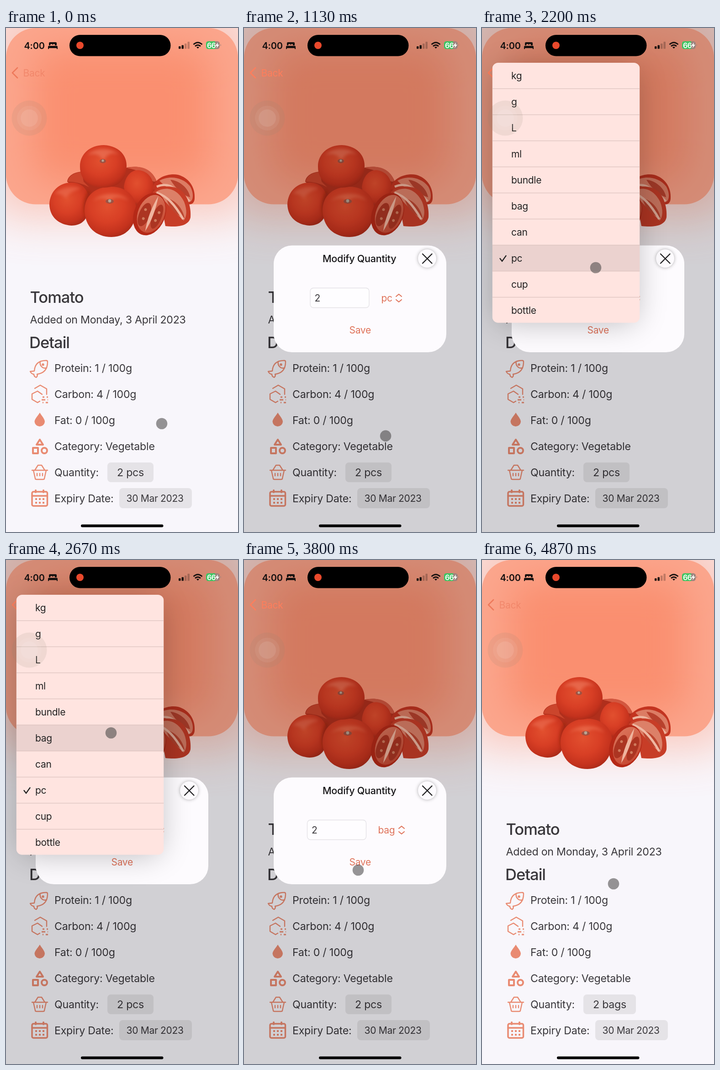
Recreate the animation shown at these times as an HTML page. Size 508 by 1102 pixels, loop 4940 ms.

```html
<!DOCTYPE html>
<html lang="en">
<head>
<meta charset="utf-8">
<title>Modify quantity</title>
<style>
html, body { margin: 0; width: 100%; height: 100%; overflow: hidden; background: #f8f6fb; }
svg { display: block; width: 100vw; height: 100vh; }
text { font: 23.2px Inter, "Open Sans", sans-serif; letter-spacing: -.25px; fill: #39373b; white-space: pre; }
.head { font-size: 34.5px; font-weight: 500; letter-spacing: -1px; }
.small { font-size: 21px; letter-spacing: -.3px; }
.accent { fill: #df7259; }
.line { fill: none; stroke: #e98b72; stroke-width: 2.4; stroke-linejoin: round; stroke-linecap: round; }
.solid { fill: #e98b72; }
</style>
</head>
<body>
<svg viewBox="0 0 508 1102" preserveAspectRatio="none">
  <defs>
    <filter id="glow" filterUnits="userSpaceOnUse" x="-200" y="-200" width="908" height="1000"><feGaussianBlur stdDeviation="50"/></filter>
    <filter id="soft" filterUnits="userSpaceOnUse" x="-100" y="-100" width="708" height="700"><feGaussianBlur stdDeviation="42"/></filter>
    <filter id="shade" x="-50%" y="-50%" width="200%" height="200%"><feGaussianBlur stdDeviation="34"/></filter>
    <filter id="blur3" x="-50%" y="-50%" width="200%" height="200%"><feGaussianBlur stdDeviation="3"/></filter>
    <radialGradient id="red" cx=".44" cy=".38" r=".66">
      <stop offset="0" stop-color="#e2502f"/><stop offset=".5" stop-color="#d83f25"/>
      <stop offset=".82" stop-color="#c4321d"/><stop offset="1" stop-color="#a82a18"/>
    </radialGradient>
    <linearGradient id="flesh" x1="0" y1="0" x2="1" y2="1">
      <stop offset="0" stop-color="#dd7a60"/><stop offset="1" stop-color="#c4422c"/>
    </linearGradient>
    <clipPath id="card"><rect width="508" height="385.5" rx="65"/></clipPath>
    <clipPath id="menuClip"><rect id="clipBox" width="323" rx="13"/></clipPath>
  </defs>

  <rect width="508" height="1102" fill="#f8f6fb"/>
  <rect x="-40" y="-60" width="588" height="474" rx="60" fill="#fb8f70" opacity=".44" filter="url(#glow)"/>
  <g clip-path="url(#card)">
    <rect width="508" height="390" fill="#fba68d"/>
    <rect x="58" y="40" width="392" height="300" rx="50" fill="#fa8f70" filter="url(#soft)"/>
  </g>

  <g id="tomatoes">
    <path d="M134 336C136 322 150 315 166 314L262 306C290 299 318 307 329 333L340 372L300 402L180 402L150 350Z" fill="#b02f1c"/>
    <path d="M135 336C138 322 150 316 166 315L170 336L182 348Q160 336 135 336Z" fill="#cb452c"/>
    <path d="M265 306C293 299 319 307 329 334Q324 339 316 331Q298 312 265 306Z" fill="#d2573f"/>
    <path d="M258 348C261 322 276 309 292 311C312 314 325 330 323 356C318 374 300 385 288 386Q262 374 258 348Z" fill="url(#red)"/>
    <path d="M95 386C96 355 119 337 145 338C169 338 184 358 183 387C181 416 168 432 143 432C116 430 96 414 95 386Z" fill="url(#red)"/>
    <path d="M106 362C118 350 141 344 164 350C149 356 139 359 131 372C124 364 116 362 106 362Z" fill="#ee765a" opacity=".5" filter="url(#blur3)"/>
    <path d="M180 354Q190 372 176 400Q172 412 178 422Q166 400 172 376Z" fill="#95220f" opacity=".7" filter="url(#blur3)"/>
    <path d="M172 399C172 366 196 347 230 347C263 347 285 367 285 397C285 432 264 457 231 457C196 457 173 434 172 399Z" fill="url(#red)"/>
    <path d="M190 379C207 359 251 356 269 378C248 367 235 369 227 380C216 370 203 371 190 379Z" fill="#f07b5b" opacity=".5" filter="url(#blur3)"/>
    <path d="M162 304C161 277 183 256 214 256C244 257 265 276 264 303C263 332 247 348 214 349C183 349 162 332 162 304Z" fill="url(#red)"/>
    <path d="M178 278C193 262 228 259 248 277C232 270 222 276 213 289C205 276 193 273 178 278Z" fill="#f1866b" opacity=".5" filter="url(#blur3)"/>
    <g fill="#9f5141"><ellipse cx="212" cy="291" rx="7" ry="4.5"/><ellipse cx="227" cy="379" rx="9" ry="5"/></g>
    <g fill="#b8a493"><circle cx="212" cy="290" r="2.6"/><circle cx="227" cy="378" r="3.4"/></g>
    <path d="M320 352C326 326 356 317 377 321C399 327 415 347 413 373C412 386 402 389 391 381L350 362Z" fill="#c33420"/>
    <path d="M336 334C358 321 388 327 403 346C412 361 411 380 400 381C385 367 359 357 336 334Z" fill="#dc7c64"/>
    <path d="M360 332C379 333 400 350 403 370C390 367 373 353 360 332Z" fill="#b8412d"/>
    <path d="M330 347Q352 338 368 351Q384 359 402 379" fill="none" stroke="#eeb39d" stroke-width="5"/>
    <path d="M321 359C335 344 363 343 380 353C397 363 406 391 404 414C401 430 382 437 349 433L341 389Z" fill="#c73d27"/>
    <path d="M327 359C351 344 376 352 390 380C397 398 396 413 389 421C370 404 352 381 327 359Z" fill="#dc8068"/>
    <path d="M352 373C368 374 387 393 391 416C373 409 356 395 352 373Z" fill="#bd452f"/>
    <path d="M330 360C353 368 369 385 388 418" fill="none" stroke="#efb7a2" stroke-width="5"/>
    <g transform="rotate(22 314 408)">
      <ellipse cx="314" cy="407" rx="34" ry="48" fill="#b52917"/>
      <ellipse cx="317" cy="405" rx="29" ry="43" fill="url(#flesh)"/>
      <ellipse cx="304" cy="412" rx="12" ry="27" fill="#ac3522"/>
      <ellipse cx="331" cy="406" rx="10" ry="28" fill="#ac3522"/>
      <path d="M317 363Q310 406 319 445Q326 407 317 363Z" fill="#efb49e"/>
      <g fill="#cf7a5c"><circle cx="302" cy="401" r="3"/><circle cx="305" cy="421" r="3"/><circle cx="332" cy="396" r="3"/><circle cx="331" cy="415" r="3"/></g>
    </g>
  </g>

  <text class="head" x="52.5" y="600.5">Tomato</text>
  <text x="52.5" y="645.5">Added on Monday, 3 April 2023</text>
  <text class="head" x="51" y="699.5">Detail</text>
  <g id="rows"></g>

  <g class="line">
    <path d="M62 750C63 735 72 727 88 727Q91 727 91 730C91 746 83 755 68 757M62 750L53 751Q56 757 61 757Q61 762 66 764Q70 761 68 757M75 729C73 738 80 746 89 743"/>
    <circle cx="81" cy="736" r="1.5"/>
    <path d="M63 788L75 781L89 789V801M79 801L69 794L57 800V812L69 819L74 816"/>
    <path d="M80 807H84M89 807H92M78 813H86M91 813H92M80 819H82M87 819H92" stroke-width="3" stroke-linecap="butt"/>
    <path d="M74 900L81 911H67Z" stroke-width="4"/>
    <path d="M59 918H70V930H59Z" stroke-width="4"/><circle cx="84" cy="924" r="6" stroke-width="4"/>
    <path d="M57 967H91M60 967L64 985Q64 987 67 987H81Q84 987 84 985L88 967M63 967L70 956H78L85 967M68 974V979M74 974V979M80 974V979"/>
    <rect x="57" y="1014" width="33.5" height="31" rx="3" stroke-width="3.5"/>
    <path d="M57 1023H90" stroke-width="3.5"/><path d="M65 1011V1015M82 1011V1015" stroke-width="4"/>
    <path d="M64 1030H84M64 1038H84" stroke-width="4" stroke-dasharray="4 4" stroke-linecap="butt"/>
  </g>
  <path class="solid" d="M74 841C79 849 85 855 85 861A11.3 11.3 0 0 1 62.5 861C62.5 855 69 849 74 841Z"/>
  <g id="quantity">
    <rect id="chip" x="222" y="950" height="43" rx="7.5" fill="#e5e3e7"/>
    <text id="chipText" x="243" y="980"></text>
  </g>
  <rect x="248" y="1006" width="159" height="44" rx="8" fill="#e5e3e7"/>
  <text class="small" x="263.5" y="1036">30 Mar 2023</text>

  <rect id="dim" width="508" height="1102" fill="#000"/>

  <g id="back">
    <path d="M25 87L14 98L25 109" fill="none" stroke-width="2.7" stroke-linecap="round" stroke-linejoin="round"/>
    <text class="small" x="37.5" y="105.5" style="fill:inherit">Back</text>
  </g>

  <g id="dialog">
    <rect x="65" y="475.5" width="378" height="233.5" rx="40" fill="#fdfbfe"/>
    <text x="172" y="512" style="font-size:21.5px;font-weight:500;fill:#151416">Modify Quantity</text>
    <circle cx="401" cy="504" r="21.5" fill="#999" opacity=".5" filter="url(#blur3)"/>
    <circle cx="401" cy="504" r="20.5" fill="#fdfbfe" stroke="#d9d7da"/>
    <path d="M391 494L411.5 514.5M411.5 494L391 514.5" stroke="#1b1a1c" stroke-width="2.2" stroke-linecap="round"/>
    <g id="field">
      <rect x="138.5" y="568.5" width="129" height="43" rx="7" fill="#fefdff" stroke="#e3e1e5" stroke-width="1.3"/>
      <text class="small" x="148" y="598">2</text>
    </g>
    <text id="unit" class="small accent" y="598"></text>
    <path id="arrows" d="M-6 587L0 582L6 587M-6 594L0 599L6 594" fill="none" stroke="#df7259" stroke-width="2" stroke-linecap="round" stroke-linejoin="round"/>
    <text class="small accent" x="230.5" y="668">Save</text>
  </g>

  <g id="menu">
    <rect id="menuShade" x="8" y="14" width="307" rx="20" filter="url(#shade)"/>
    <g clip-path="url(#menuClip)">
      <rect id="menuBox" width="323" height="570" fill="#ffe4e0"/>
      <rect id="hover" width="323" height="57" opacity=".08"/>
      <g id="items"></g>
      <path d="M17 428L21.5 434L30 422" fill="none" stroke="#222" stroke-width="2.3" stroke-linecap="round" stroke-linejoin="round"/>
    </g>
  </g>

  <g>
    <circle cx="51" cy="197" r="38.5" fill="#8f8078" opacity=".13"/>
    <circle cx="51" cy="197" r="27" fill="#fff" opacity=".06"/>
    <circle cx="51" cy="197" r="19" fill="#fff" opacity=".09"/>
  </g>

  <text x="39.5" y="45.5" style="font-size:20px;font-weight:600;fill:#141010">4:00</text>
  <g fill="#17110f">
    <path d="M94 38V33Q94 31 97 31H108Q111 31 111 33V38H107V36Q107 35 105 35H104Q103 35 103 37H102Q102 35 100 35H99Q97 35 97 37V38ZM92 41Q92 39 94 39H111Q113 39 113 41V46H111V44H94V46H92Z"/>
    <rect x="378" y="40" width="4.5" height="5.5" rx="1"/><rect x="384.5" y="37.5" width="4.5" height="8" rx="1"/>
    <g opacity=".25"><rect x="391" y="34" width="4.5" height="11.5" rx="1"/><rect x="397.5" y="30" width="4.5" height="15.5" rx="1"/></g>
    <rect x="139" y="15" width="221.5" height="46.5" rx="23.2" fill="#000"/>
    <rect x="164" y="1085.5" width="180.5" height="6" rx="3" fill="#000"/>
  </g>
  <circle cx="162" cy="38" r="8" fill="#e9492c"/>
  <g fill="none" stroke="#17110f" stroke-width="2.9">
    <path d="M410.5 36Q420 27.5 429.5 36M414 39.8Q420 34.5 426 39.8"/><path d="M420 45L417 42Q420 40 423 42Z" fill="#17110f" stroke="none"/>
  </g>
  <rect x="438" y="29" width="30" height="17" rx="5.5" fill="#9c837d"/>
  <path d="M458 29H443.5Q438 29 438 34.5V40.5Q438 46 443.5 46H458Z" fill="#3fc562"/>
  <path d="M469.5 35Q472 37.5 469.5 40Z" fill="#9c837d"/>
  <text x="440" y="43.5" style="font-size:16px;font-weight:600;fill:#fff;letter-spacing:-.8px">66</text>
  <path d="M464 31.5L458.5 39H462L461 44L467 36.5H463.3Z" fill="#fff"/>

  <circle id="cursor" r="12.3" fill="#464444"/>
</svg>

<script>
const LOOP = 4940, ROW = 57, MENU_W = 323, MENU_TOP = 76;
const el = id => document.getElementById(id);
const set = (id, attrs) => { for (const k in attrs) el(id).setAttribute(k, attrs[k]); };
const smooth = u => u * u * (3 - 2 * u);
const linear = u => u;

// Each key is [time, ...values].
function track(t, keys, ease = smooth) {
  const next = keys.findIndex(k => k[0] > t);
  if (next < 0) return keys[keys.length - 1].slice(1);
  if (next === 0) return keys[0].slice(1);
  const a = keys[next - 1], b = keys[next];
  const u = ease((t - a[0]) / (b[0] - a[0]));
  return a.slice(1).map((v, i) => v + (b[i + 1] - v) * u);
}

const units = ["kg", "g", "L", "ml", "bundle", "bag", "can", "pc", "cup", "bottle"];
const details = ["Protein: 1 / 100g", "Carbon: 4 / 100g", "Fat: 0 / 100g", "Category: Vegetable", "Quantity:", "Expiry Date:"];

el("rows").innerHTML = details.map((s, i) => `<text x="106" y="${751.5 + ROW * i}">${s}</text>`).join("");
el("items").innerHTML = units.map((s, i) =>
  `<text class="small" x="41.5" y="${36 + ROW * i}" style="fill:#222">${s}</text>` +
  (i ? `<path d="M0 ${ROW * i - .3}H${MENU_W}" stroke="#dcc3bf" stroke-width="1.2"/>` : "")).join("");

// x, y, opacity
const cursorKeys = [
  [0, 341, 865, .56], [130, 341, 865, .56], [620, 307, 983, .56], [700, 307, 983, .64], [830, 307, 983, .56],
  [950, 307, 983, .56], [1520, 320, 601, .56], [1780, 320, 601, .56], [2200, 249, 524, .56],
  [2660, 230, 378, .56], [2760, 230, 378, .82], [3020, 230, 378, .82], [3120, 230, 378, .56],
  [3680, 250, 678, .56], [4250, 250, 678, .56], [4870, 288, 708, .56]
];
// scale, right, top, bottom, panel opacity, text opacity
const shut = [.35, 328, 570, 606, 0, 0];
const small = [.545, 330, 450, 613, .28, .62];
const medium = [.725, 330, 331, 618, .62, .76];
const full = [1, 345.5, MENU_TOP, 644.5, 1, 1];
const menuKeys = [
  [1665, ...shut], [1730, ...small], [1800, ...medium], [2000, ...full],
  [2870, ...full], [3000, ...medium], [3070, ...small], [3140, ...shut]
];

function drawMenu(t, cursorY) {
  const [scale, right, top, bottom, panel, ink] = track(t, menuKeys, linear);
  const height = (bottom - top) / scale;
  set("menu", { transform: `translate(${right - MENU_W * scale} ${top}) scale(${scale})`,
    visibility: panel > 0 ? "visible" : "hidden" });
  set("clipBox", { height });
  set("menuShade", { height: Math.max(0, height - 14), opacity: .26 * panel });
  set("menuBox", { opacity: panel });
  set("items", { opacity: ink });
  const row = Math.floor((cursorY - MENU_TOP) / ROW);
  set("hover", { y: ROW * row, visibility: t > 2050 && panel > 0 ? "visible" : "hidden" });
}

function render(t) {
  const [x, y, alpha] = track(t, cursorKeys);
  set("cursor", { cx: x, cy: y, opacity: alpha });

  const [shown] = track(t, [[880, 0], [1080, 1], [4080, 1], [4270, 0]]);
  set("dim", { opacity: .155 * shown });
  set("dialog", { opacity: shown });
  const tint = `rgb(${238 + 16 * shown},${128 - 2 * shown},${100 - 8 * shown})`;
  set("back", { fill: tint, opacity: .75 + .25 * shown });
  el("back").firstElementChild.setAttribute("stroke", shown > .5 ? tint : "#ea6c4c");

  const saved = t >= 4080;
  set("chip", { width: saved ? 115 : 101 });
  el("chipText").textContent = saved ? "2 bags" : "2 pcs";
  set("quantity", { opacity: track(t, [[670, 1], [720, .2], [780, .2], [950, 1]])[0] });

  const picked = t >= 2850;
  set("field", { transform: `translate(${picked ? 0 : 6.5} 0)` });
  el("unit").textContent = picked ? "bag" : "pc";
  set("unit", { x: picked ? 293.5 : 300.5,
    opacity: track(t, [[1640, 1], [1730, .4], [2900, .4], [3000, .65], [3160, 1]])[0] });
  set("arrows", { transform: `translate(${picked ? 345 : 339} 0)` });

  drawMenu(t, y);
}

const start = performance.now();
function tick() {
  render((performance.now() - start) % LOOP);
  requestAnimationFrame(tick);
}
tick();
</script>
</body>
</html>
```
